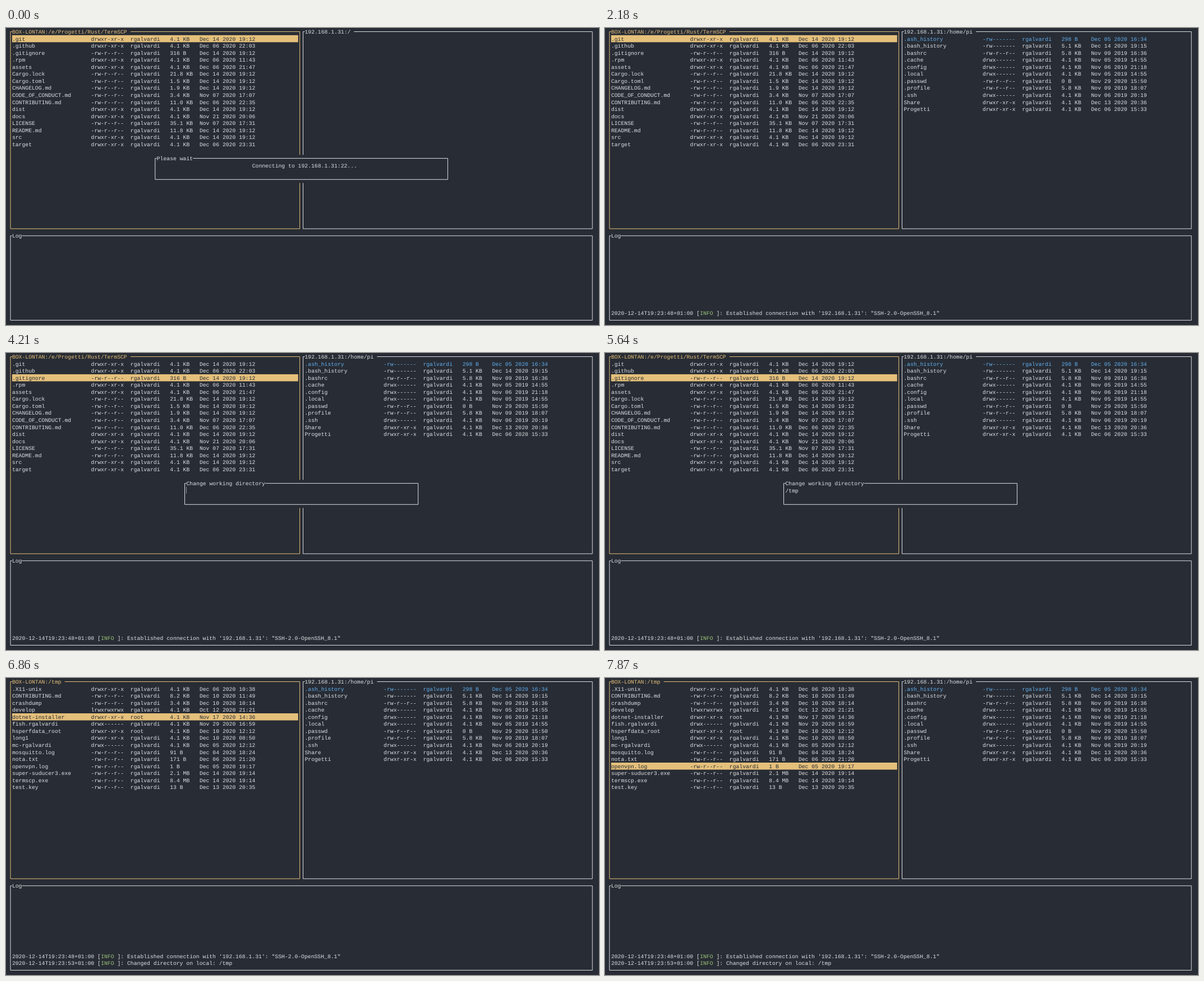
These frames come from a looping animation (1057 px wide and 530 px high, 8000 ms). An HTML page:

```html
<!DOCTYPE html>
<html lang="en">
<head>
<meta charset="utf-8">
<title>Terminal file transfer</title>
<style>
html, body { margin: 0; width: 100%; height: 100%; overflow: hidden; background: #282c34; }
svg { display: block; width: 1057px; height: 530px; }
text {
  font: 9.766px "Liberation Mono", "Noto Sans Mono", monospace;
  white-space: pre;
  text-rendering: geometricPrecision;
}
</style>
</head>
<body>
<svg id="stage" viewBox="0 0 1057 530"></svg>
<script>
const LOOP = 8000;
const CW = 5.86, RH = 12.56, X0 = 5.05, Y0 = 0.25;
const BG = '#282c34', FG = '#dcdfe4', GOLD = '#e5c07b', BLUE = '#61afef', GREEN = '#98c379';
const HOST = 'BOX-LONTAN:';
const OFFSETS = [0, 24, 36, 48, 57];

// Columns are separated by two spaces; "@" stands for the usual owner.
const parse = list => list.trim().split('\n').map(line =>
  line.replace(/@/g, 'rgalvardi').split('  '));

const project = parse(`
.git  drwxr-xr-x  @  4.1 KB  Dec 14 2020 19:12
.github  drwxr-xr-x  @  4.1 KB  Dec 06 2020 22:03
.gitignore  -rw-r--r--  @  316 B  Dec 14 2020 19:12
.rpm  drwxr-xr-x  @  4.1 KB  Dec 06 2020 11:43
assets  drwxr-xr-x  @  4.1 KB  Dec 06 2020 21:47
Cargo.lock  -rw-r--r--  @  21.8 KB  Dec 14 2020 19:12
Cargo.toml  -rw-r--r--  @  1.5 KB  Dec 14 2020 19:12
CHANGELOG.md  -rw-r--r--  @  1.9 KB  Dec 14 2020 19:12
CODE_OF_CONDUCT.md  -rw-r--r--  @  3.4 KB  Nov 07 2020 17:07
CONTRIBUTING.md  -rw-r--r--  @  11.0 KB  Dec 06 2020 22:35
dist  drwxr-xr-x  @  4.1 KB  Dec 14 2020 19:12
docs  drwxr-xr-x  @  4.1 KB  Nov 21 2020 20:06
LICENSE  -rw-r--r--  @  35.1 KB  Nov 07 2020 17:31
README.md  -rw-r--r--  @  11.8 KB  Dec 14 2020 19:12
src  drwxr-xr-x  @  4.1 KB  Dec 14 2020 19:12
target  drwxr-xr-x  @  4.1 KB  Dec 06 2020 23:31`);

const temp = parse(`
.X11-unix  drwxr-xr-x  @  4.1 KB  Dec 06 2020 10:38
CONTRIBUTING.md  -rw-r--r--  @  8.2 KB  Dec 10 2020 11:49
crashdump  -rw-r--r--  @  3.4 KB  Dec 10 2020 10:14
develop  lrwxrwxrwx  @  4.1 KB  Oct 12 2020 21:21
dotnet-installer  drwxr-xr-x  root  4.1 KB  Nov 17 2020 14:36
fish.@  drwx------  @  4.1 KB  Nov 29 2020 16:59
hsperfdata_root  drwxr-xr-x  root  4.1 KB  Dec 10 2020 12:12
long1  drwxr-xr-x  @  4.1 KB  Dec 10 2020 08:50
mc-@  drwx------  @  4.1 KB  Dec 05 2020 12:12
mosquitto.log  -rw-r--r--  @  91 B  Dec 04 2020 18:24
nota.txt  -rw-r--r--  @  171 B  Dec 06 2020 21:20
openvpn.log  -rw-r--r--  @  1 B  Dec 05 2020 19:17
super-suducer3.exe  -rw-r--r--  @  2.1 MB  Dec 14 2020 19:14
termscp.exe  -rw-r--r--  @  8.4 MB  Dec 14 2020 19:14
test.key  -rw-r--r--  @  13 B  Dec 13 2020 20:35`);

const remote = parse(`
.ash_history  -rw-------  @  298 B  Dec 05 2020 16:34
.bash_history  -rw-------  @  5.1 KB  Dec 14 2020 19:15
.bashrc  -rw-r--r--  @  5.8 KB  Nov 09 2019 16:36
.cache  drwx------  @  4.1 KB  Nov 05 2019 14:55
.config  drwx------  @  4.1 KB  Nov 06 2019 21:18
.local  drwx------  @  4.1 KB  Nov 05 2019 14:55
.passwd  -rw-r--r--  @  0 B  Nov 29 2020 15:50
.profile  -rw-r--r--  @  5.8 KB  Nov 09 2019 18:07
.ssh  drwx------  @  4.1 KB  Nov 06 2019 20:19
Share  drwxr-xr-x  @  4.1 KB  Dec 13 2020 20:36
Progetti  drwxr-xr-x  @  4.1 KB  Dec 06 2020 15:33`);

const logs = [
  ['2020-12-14T19:23:48+01:00', `Established connection with '192.168.1.31': "SSH-2.0-OpenSSH_8.1"`],
  ['2020-12-14T19:23:53+01:00', 'Changed directory on local: /tmp']
];

// Each step adds its changes to the state before it.
const steps = [
  [0, { local: project, localPath: '/e/Progetti/Rust/TermSCP', pick: 1, focus: 'local',
        files: [], remotePath: '/', log: 0, popup: 'wait', typed: '', caret: true, mouse: null }],
  [350, { files: remote, remotePath: '/home/pi', log: 1, popup: '' }],
  [1560, { mouse: [657, 525] }],
  [1780, { mouse: [650, 508] }],
  [1980, { mouse: [656, 529] }],
  [2180, { mouse: null }],
  [3190, { focus: 'remote' }],
  [3590, { focus: 'local' }],
  [3790, { pick: 3 }],
  [4210, { popup: 'input' }],
  [4620, { typed: '/' }],
  [4820, { typed: '/tm' }],
  [5020, { typed: '/tmp' }],
  [5640, { caret: false }],
  [5840, { popup: '', local: temp, localPath: '/tmp', pick: 1, log: 2 }],
  [6440, { pick: 2 }],
  [6660, { pick: 3 }],
  [6860, { pick: 5 }],
  [7470, { pick: 9 }],
  [7670, { pick: 11 }],
  [7870, { pick: 12 }]
];
const states = [];
steps.forEach(([, change], i) => states.push({ ...states[i - 1], ...change }));

const colX = c => X0 + c * CW;
const rowY = r => Y0 + r * RH;
const n = v => v.toFixed(2);

const rect = (x, y, w, h, fill) =>
  `<rect x="${n(x)}" y="${n(y)}" width="${n(w)}" height="${n(h)}" fill="${fill}"/>`;

const cells = (c, r, cols, rows, fill) => rect(colX(c), rowY(r), cols * CW, rows * RH, fill);

const label = (c, r, str, fill = FG) =>
  `<text x="${n(colX(c))}" y="${n(rowY(r) + 9.7)}" fill="${fill}">${str}</text>`;

function box(c0, r0, c1, r1, title, color = FG) {
  const left = colX(c0 + 0.5), right = colX(c1 + 0.5);
  const top = rowY(r0 + 0.5), bottom = rowY(r1 + 0.5);
  const d = `M${n(colX(c0 + 1 + title.length))} ${n(top)}H${n(right)}V${n(bottom)}` +
    `H${n(left)}V${n(top)}H${n(colX(c0 + 1))}`;
  return `<path d="${d}" fill="none" stroke="${color}"/>` + label(c0 + 1, r0, title, color);
}

function panel(col, title, rows, pick, accent, active) {
  let out = box(col, 0, col + 88, 28, title, active ? accent : FG);
  rows.forEach((row, i) => {
    const picked = i + 1 === pick;
    if (picked && active) out += cells(col + 1, pick, 87, 1, accent);
    const fill = !picked ? FG : active ? BG : accent;
    row.forEach((str, k) => out += label(col + 1 + OFFSETS[k], i + 1, str, fill));
  });
  return out;
}

function logPanel(count) {
  let out = box(0, 29, 177, 41, 'Log');
  logs.slice(0, count).forEach(([time, msg], i) => {
    const r = 41 - count + i;
    out += label(1, r, time + ' [') + label(28, r, 'INFO', GREEN) +
      label(33, r, ']:') + label(36, r, msg);
  });
  return out;
}

function popup(s) {
  if (s.popup === 'wait')
    return cells(44, 18, 90, 4, BG) + box(44, 18, 133, 21, 'Please wait') +
      label(74, 19, 'Connecting to 192.168.1.31:22...');
  if (s.popup === 'input') {
    const bar = rect(Math.round(colX(54 + s.typed.length)), rowY(19), 1, RH - 0.6, '#9097a3');
    return cells(53, 18, 72, 4, BG) + box(53, 18, 124, 21, 'Change working directory') +
      label(54, 19, s.typed) + (s.caret ? bar : '');
  }
  return '';
}

const pointer = ([x, y]) =>
  `<path transform="translate(${x + 0.5} ${y + 0.5})" fill="#fff" stroke="#000"
    d="M0 0V16.5L4 13L6.8 19.5L9.2 18.5L6.5 12H12Z"/>`;

const render = s =>
  panel(0, HOST + s.localPath + ' ', s.local, s.pick, GOLD, s.focus === 'local') +
  panel(89, '192.168.1.31:' + s.remotePath + ' ', s.files, 1, BLUE, s.focus === 'remote') +
  logPanel(s.log) + popup(s) + (s.mouse ? pointer(s.mouse) : '');

const stage = document.getElementById('stage');
let shown = -1;

function tick() {
  const t = performance.now() % LOOP;
  const i = steps.findLastIndex(([at]) => at <= t);
  if (i !== shown) {
    shown = i;
    stage.innerHTML = render(states[i]);
  }
  requestAnimationFrame(tick);
}
tick();
</script>
</body>
</html>
```
